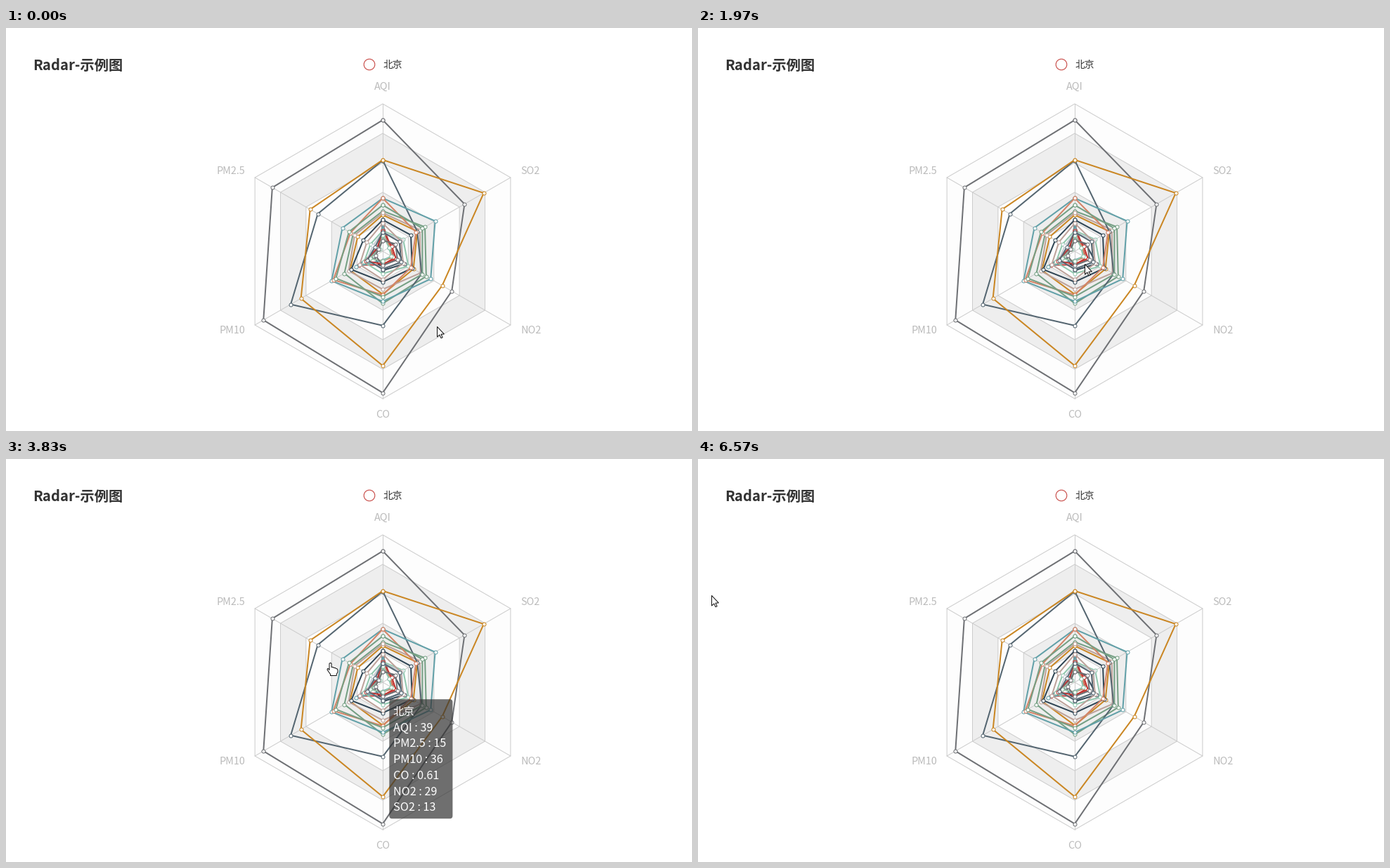
These frames come from a looping animation (976x574 px, 8660 ms). A matplotlib script:

```python
import numpy as np
import matplotlib.pyplot as plt
from matplotlib.animation import FuncAnimation
from matplotlib.colors import to_rgb
from matplotlib.patches import Circle, FancyBboxPatch, Polygon

W, H, DPI = 976, 574, 100
LOOP, STEP = 8660, 20
PT = 72 / DPI
plt.rcParams["font.family"] = ["Noto Sans CJK JP", "DejaVu Sans"]

CITY = "北京"
CENTER, RADIUS = np.array([536, 318]), 210
NAMES = ["AQI", "PM2.5", "PM10", "CO", "NO2", "SO2"]
LIMITS = np.array([300, 250, 300, 5, 200, 100])
PALETTE = ["#c23531", "#2f4554", "#61a0a8", "#d48265", "#91c7ae", "#749f83",
           "#ca8622", "#bda29a", "#6e7074", "#546570", "#c4ccd3"]
DAYS = [
    [55, 9, 56, .46, 18, 6], [25, 11, 21, .65, 34, 9], [56, 7, 63, .3, 14, 5],
    [33, 7, 29, .33, 16, 6], [42, 24, 44, .76, 40, 16], [82, 58, 90, 1.77, 68, 33],
    [74, 49, 77, 1.46, 48, 27], [78, 55, 80, 1.29, 59, 29],
    [267, 216, 280, 4.8, 108, 64], [185, 127, 216, 2.52, 61, 27],
    [39, 19, 38, .57, 31, 15], [41, 11, 40, .43, 21, 7], [64, 38, 74, 1.04, 46, 22],
    [108, 79, 120, 1.7, 75, 41], [108, 63, 116, 1.48, 44, 26],
    [33, 6, 29, .34, 13, 5], [94, 66, 110, 1.54, 62, 31],
    [186, 142, 192, 3.88, 93, 79], [57, 31, 54, .96, 32, 14],
    [22, 8, 17, .48, 23, 10], [39, 15, 36, .61, 29, 13]]

# Pointer path: time, x, y
POINTER = np.array([
    (0, 613, 425), (29, 613, 425), (30, 584, 408), (230, 584, 408), (370, 558, 388),
    (630, 558, 388), (770, 559, 364), (1200, 623, 382), (1670, 623, 382),
    (1970, 547, 334), (2630, 499, 309), (3430, 469, 278), (3830, 461, 290),
    (4330, 454, 274), (4730, 460, 255), (5230, 429, 148), (6130, 166, 290),
    (6569, 16, 192)])
POINTER_END = 6570
HAND_TIMES = [(630, 1750), (2500, 4600), (5320, 5600)]

# Tooltip: day index, show time, hide time, path of (time, left, top)
TOOLTIPS = [
    (8, 230, 370, [(230, 552, 281), (370, 621, 215)]),
    (8, 630, 1760, [(630, 621, 215), (770, 635, 237), (860, 641, 340),
                    (980, 644, 390), (1200, 645, 404)]),
    (18, 2530, 3260, [(2530, 583, 363), (2630, 582, 362), (3260, 558, 352)]),
    (20, 3260, 4300, [(3260, 558, 352), (3470, 556, 350), (3830, 545, 342),
                      (4300, 549, 329)]),
    (6, 4300, 4860, [(4300, 549, 328), (4730, 541, 311), (4860, 540, 309)]),
    (8, 5320, 5700, [(5320, 547, 343), (5420, 490, 260), (5700, 455, 205)])]

ARROW = np.array([(0, 0), (0, 14.5), (3.3, 11.5), (5.5, 16.2), (7.6, 15.3),
                  (5.5, 10.7), (9.8, 10.4)])
HAND = np.array([(-1.5, 1), (-.5, 0), (.8, 0), (1.6, 1.2), (1.6, 6), (4, 6), (5, 7),
                 (7, 7), (8, 8), (9.8, 8.5), (10.5, 10), (10.5, 13), (8.7, 16),
                 (8.7, 18), (0, 18), (0, 16), (-3, 11.8), (-4.5, 9.5), (-4, 8),
                 (-2.6, 8.4), (-1.5, 10)])

fig = plt.figure(figsize=(W / DPI, H / DPI), dpi=DPI, facecolor="white")
ax = fig.add_axes([0, 0, 1, 1])
ax.set(xlim=(0, W), ylim=(H, 0))
ax.axis("off")

ANGLES = np.pi / 2 + np.arange(6) * np.pi / 3
SPOKES = np.column_stack([np.cos(ANGLES), -np.sin(ANGLES)])


def radar_points(ratios):
    """Closed outline through the given fraction of each spoke."""
    points = CENTER + RADIUS * np.reshape(ratios, (-1, 1)) * SPOKES
    return np.vstack([points, points[:1]])


def label(x, y, text, size, color, zorder=3, **style):
    return ax.text(x, y, text, fontsize=size * PT, color=color, zorder=zorder,
                   va="baseline", **style)


def series_line(day, color, zorder):
    points = radar_points(np.array(DAYS[day]) / LIMITS)
    return ax.plot(*points.T, color=color, lw=2 * PT, marker="o", ms=5 * PT,
                   mfc="white", mec=color, mew=PT, zorder=zorder,
                   solid_joinstyle="miter")[0]


def brighter(color):
    return tuple(min(1, 1.12 * c) for c in to_rgb(color))


def day_color(day):
    return PALETTE[day % len(PALETTE)]


def draw_grid():
    for ring in range(5, 0, -1):
        fill = "#fdfdfd" if ring % 2 else "#eeeeee"
        ax.add_patch(Polygon(radar_points(np.full(6, ring / 5)), fc=fill,
                             ec="#cccccc", lw=PT, zorder=1))
    for tip in radar_points(np.ones(6))[:6]:
        ax.plot(*np.array([CENTER, tip]).T, color="#cccccc", lw=PT, zorder=1.5)
    spots = [(536, 88, "center"), (340, 208, "right"), (340, 435, "right"),
             (536, 555, "center"), (732.5, 435, "left"), (732.5, 208, "left")]
    for name, (x, y, align) in zip(NAMES, spots):
        label(x, y, name, 14.4, "#bbbbbb", ha=align)


def draw_heading():
    label(38, 59.5, "Radar-示例图", 20.3, "#333333", weight="bold")
    ax.add_patch(Circle((517, 52), 7.8, fc="white", ec="#c23531", lw=PT))
    label(536.5, 56.5, CITY, 13.8, "#333333")


draw_grid()
draw_heading()
for day in range(len(DAYS)):
    series_line(day, day_color(day), 2)

highlights = {day: series_line(day, brighter(day_color(day)), 2.5)
              for day in {tip[0] for tip in TOOLTIPS}}
box = FancyBboxPatch((0, 0), 98, 170, boxstyle="round,pad=0,rounding_size=4",
                     fc=(50 / 255, 50 / 255, 50 / 255, .7), ec="none", zorder=5)
ax.add_patch(box)
rows = [label(0, 0, "", 16.2 if i else 15.4, "white", zorder=6) for i in range(7)]
pointer = Polygon(ARROW, fc="white", ec="#111111", lw=PT, joinstyle="round", zorder=8)
ax.add_patch(pointer)


def along(path, t):
    times, xs, ys = np.asarray(path, float).T
    return np.interp(t, times, xs), np.interp(t, times, ys)


def place_tooltip(day, left, top):
    lines = [CITY] + [f"{n} : {v:g}" for n, v in zip(NAMES, DAYS[day])]
    width = 98.5 - 8.4 * (11 - max(map(len, lines)))
    box.set_bounds(left, top, width, 170)
    for i, (row, text) in enumerate(zip(rows, lines)):
        row.set_text(text)
        row.set_position((left + 5.4, top + 22.6 + 22.75 * i))


def update(frame):
    t = frame * STEP
    tip = next((item for item in TOOLTIPS if item[1] <= t < item[2]), None)
    for artist in [box, *rows]:
        artist.set_visible(tip is not None)
    for day, line in highlights.items():
        line.set_visible(tip is not None and day == tip[0])
    if tip:
        place_tooltip(tip[0], *along(tip[3], t))

    pointer.set_visible(t < POINTER_END)
    is_hand = any(start <= t < end for start, end in HAND_TIMES)
    pointer.set_xy((HAND if is_hand else ARROW) + np.round(along(POINTER, t)) + .5)
    return [box, pointer, *rows, *highlights.values()]


anim = FuncAnimation(fig, update, frames=LOOP // STEP, interval=STEP,
                     repeat=True, repeat_delay=0, blit=False)
plt.show()
```
